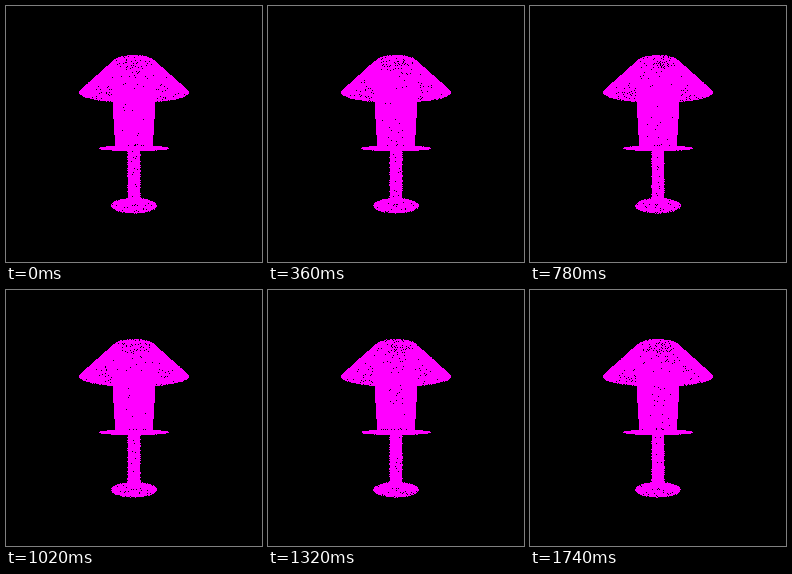
An HTML page with a canvas for the animation above (1.8 s loop, 256 by 256 pixels).

```html
<!DOCTYPE html>
<html lang="en">
<head>
<meta charset="utf-8">
<title>Turning lamp</title>
<style>
html, body { margin: 0; width: 100%; height: 100%; overflow: hidden; background: #000; }
canvas { display: block; width: 256px; height: 256px; }
</style>
</head>
<body>
<canvas id="stage" width="256" height="256"></canvas>
<script>
const LOOP = 1800, STEP = 60, CENTER = 128, CAMERA = 217;
const TAU = 2 * Math.PI, GOLDEN = Math.PI * (3 - Math.sqrt(5));
const ctx = document.getElementById('stage').getContext('2d');
const points = [];

let seed = 4711;
function random() {
  seed = (Math.imul(seed, 1664525) + 1013904223) >>> 0;
  return seed / 4294967296;
}

// Scatters points evenly over a surface of revolution between two rings
function surface(top, bottom, density) {
  const dr = bottom.r - top.r, dy = bottom.y - top.y;
  const slant = Math.hypot(dr, dy);
  const count = Math.round(Math.PI * (top.r + bottom.r) * slant * density);
  const jitter = 0.6 / Math.sqrt(density);
  for (let i = 0; i < count; i++) {
    const share = (i + 0.5) / count;
    const radius = Math.sqrt(top.r ** 2 + (bottom.r ** 2 - top.r ** 2) * share);
    const even = dr ? (radius - top.r) / dr : share;
    const u = Math.min(1, Math.max(0, even + (random() - 0.5) * jitter / slant));
    const r = top.r + dr * u;
    points.push({ r, y: top.y + dy * u, angle: i * GOLDEN + (random() - 0.5) * jitter / r });
  }
}

const ring = (r, y) => ({ r, y });
surface(ring(20, 71.5), ring(53, 39), 0.75);      // shade
surface(ring(22, 50), ring(18.3, -11.5), 1.1);    // body
surface(ring(3, -14), ring(34, -14), 0.8);        // plate
surface(ring(6, -15), ring(6, -70), 0.95);        // stem
surface(ring(4, -71), ring(22.5, -71), 0.65);     // foot

function draw(turn) {
  ctx.fillStyle = '#000';
  ctx.fillRect(0, 0, 256, 256);
  ctx.fillStyle = '#f0f';
  for (const { r, y, angle } of points) {
    const a = angle + turn;
    const scale = CAMERA / (CAMERA - r * Math.sin(a));
    const x = CENTER + r * Math.cos(a) * scale;
    ctx.fillRect(Math.floor(x), Math.floor(CENTER - y * scale), 1, 1);
  }
}

const start = performance.now();
let shown = -1;
function tick() {
  const step = Math.floor((performance.now() - start) % LOOP / STEP);
  if (step !== shown) {
    shown = step;
    draw(step * STEP / LOOP * TAU);
  }
  requestAnimationFrame(tick);
}
tick();
</script>
</body>
</html>
```
